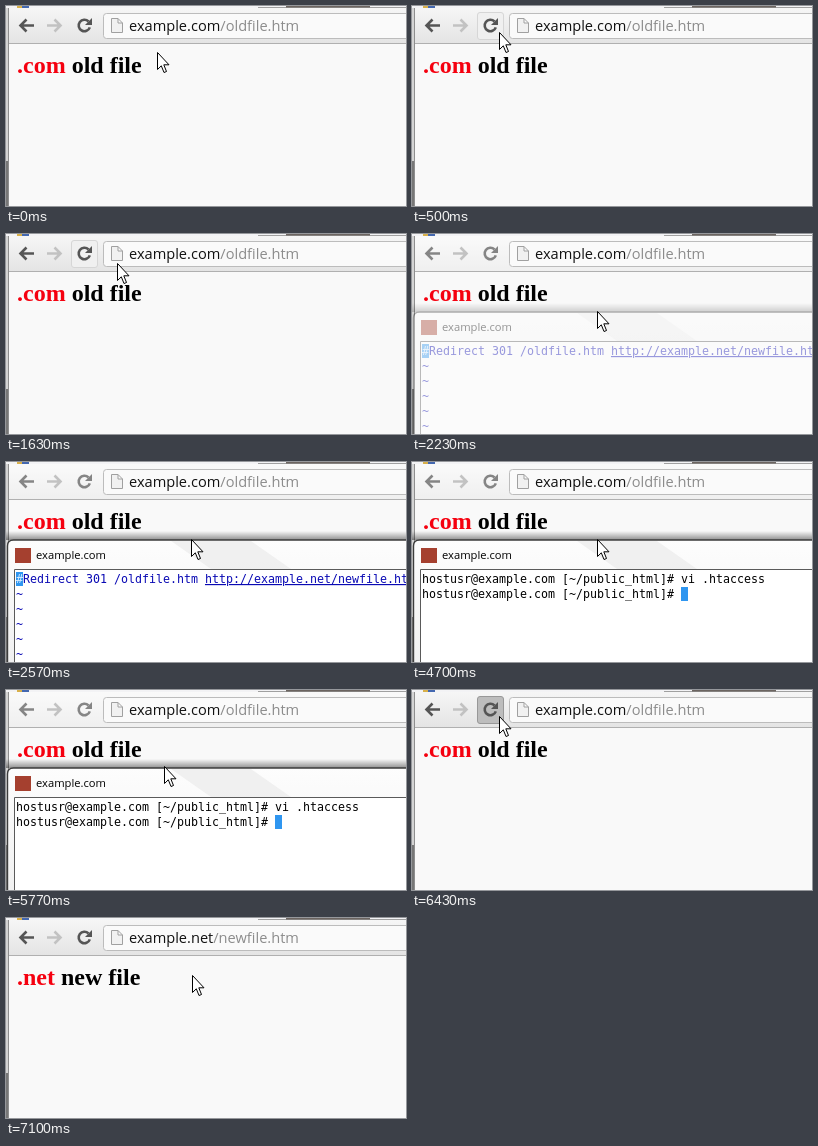
An HTML page for the animation above (7.37 s loop, 400x200 px).

```html
<!DOCTYPE html>
<html lang="en">
<head>
<meta charset="utf-8">
<title>Redirect demo</title>
<style>
  html, body { margin: 0; width: 100%; height: 100%; overflow: hidden; background: #f9f9f9; }
  svg { display: block; width: 100%; height: 100%; }
  text { white-space: pre; }
  .ui { font-family: "Open Sans", "Noto Sans", sans-serif; }
  .url { font-size: 14.6px; fill: #111; }
  .path { fill: #8c8c8c; }
  .heading { font: bold 24px "Liberation Serif", "Times New Roman", serif; }
  .red { fill: #f5000f; }
  .mono { font: 11.63px "DejaVu Sans Mono", monospace; }
  .blue { fill: #0a0ab4; }
  .cyan { fill: #00b4b4; }
  .link { text-decoration: underline; }
  .block { fill: #2f96f0; }
  .icon { fill: none; stroke: #555; stroke-width: 2.6; }
  .head { fill: #555; }
  .inactive .icon { stroke: #858585; }
  .inactive .head { fill: #858585; }
  .icon.off, .inactive .icon.off { stroke: #c2c2c2; }
  #button { fill: none; stroke: none; }
  #button.hover { fill: #f0f0f0; stroke: #d6d6d6; }
  #button.pressed { fill: #bdbdbd; stroke: #989898; }
</style>
</head>
<body>
<svg viewBox="0 0 400 200">
  <defs>
    <linearGradient id="bar" x2="0" y2="1">
      <stop stop-color="#f6f6f6"/><stop offset="1" stop-color="#e4e4e4"/>
    </linearGradient>
    <linearGradient id="glass" x2="0" y2="1">
      <stop stop-color="#fdfdfd"/><stop offset="1" stop-color="#f0f0f0"/>
    </linearGradient>
    <linearGradient id="shade" x2="0" y2="1">
      <stop stop-color="#000" stop-opacity="0"/><stop offset="1" stop-color="#000" stop-opacity=".42"/>
    </linearGradient>
  </defs>

  <g id="browser">
    <path fill="#f9f9f9" d="M0 0H400V200H0Z"/>
    <path fill="#f3f3f5" d="M0 0H400V2H0Z"/>
    <path fill="#d8b04a" d="M11 0h5v2h-5z"/>
    <path fill="#4468b0" d="M16 0h7v2h-7z"/>
    <path fill="#a0a0a0" d="M252 1H400V2H252Z"/>
    <path fill="#6b6460" d="M280 0h84v1.5h-84z"/>
    <path fill="url(#bar)" d="M2 2H400V37H2Z"/>
    <path id="lighten" fill="#fff" opacity=".4" d="M2 2H400V37H2Z"/>
    <path fill="#b0b0b0" d="M2 37H400V38H2Z"/>
    <path fill="#d4d4d4" d="M0 2H2V155H0Z"/>
    <path fill="#777" d="M0 155H2V200H0Z"/>
    <path fill="#8e8e8e" d="M2 2H3V200H2Z"/>

    <path class="icon" d="M28 19.5H15M20.5 13.5L14.5 19.5L20.5 25.5"/>
    <path class="icon off" d="M41 19.5H54M48.5 13.5L54.5 19.5L48.5 25.5"/>
    <rect id="button" x="65.5" y="6.5" width="26" height="27" rx="2.5"/>
    <path class="icon" d="M82.5 15.5A5.7 5.7 0 1 0 83.8 21.3"/>
    <path class="head" d="M86 12V19H79Z"/>

    <rect x="97.5" y="7.5" width="310" height="25" rx="3" fill="#fafafa" stroke="#bcbcbc"/>
    <path fill="#f1f1f1" stroke="#a0a0a0" d="M105.5 12.5H112L116.5 17V26.5H105.5ZM112 12.5V17H116.5"/>

    <g class="ui url">
      <text class="old" x="123" y="25">example.com<tspan class="path">/oldfile.htm</tspan></text>
      <text class="new" x="123" y="25">example.net<tspan class="path">/newfile.htm</tspan></text>
    </g>
    <g class="heading">
      <text class="old" x="11" y="67"><tspan class="red">.com</tspan> old file</text>
      <text class="new" x="11" y="67"><tspan class="red">.net</tspan> new file</text>
    </g>
  </g>

  <g id="terminal">
    <path fill="url(#shade)" d="M0 69H400V78H0Z"/>
    <path fill="url(#glass)" stroke="#3c3c3c" stroke-width="1.4" d="M1.5 210V84Q1.5 78 7.5 78H410V210Z"/>
    <path fill="#ebebeb" d="M165 79H245L285 107H205Z" opacity=".7"/>
    <path fill="#fff" stroke="#5a5a5a" d="M8.5 210V107.5H410V210Z"/>
    <rect x="9" y="86" width="16" height="15" fill="#a5402f"/>
    <text class="ui" font-size="11.2" x="30" y="97">example.com</text>

    <g class="mono">
      <g id="vi">
        <rect class="block" x="10" y="110" width="7" height="14"/>
        <g id="tildes" class="blue"></g>
        <text id="commented" class="blue" x="10" y="121"><tspan fill="#d5ecff">#</tspan>Redirect 301 /oldfile.htm <tspan class="link">http://example.net/newfile.htm</tspan></text>
        <text id="enabled" x="10" y="121"><tspan fill="#a8f0ff">R</tspan><tspan class="cyan">edirect</tspan> 301 /oldfile.htm <tspan class="link">http://<tspan class="cyan">example</tspan>.net/newfile.htm</tspan></text>
      </g>
      <g id="shell">
        <text x="10" y="121">hostusr@example.com [~/public_html]# vi .htaccess</text>
        <text x="10" y="136">hostusr@example.com [~/public_html]#</text>
        <rect class="block" x="269" y="125" width="7" height="14"/>
      </g>
    </g>
  </g>

  <path id="pointer" fill="#fff" stroke="#000" stroke-linejoin="round"
        d="M.5 .5V17.5L4.3 13.8L7 20.5L9.5 19.5L6.8 12.8H12Z"/>
</svg>
<script>
  const LOOP = 7370, TICK = 200 / 3;
  // Pointer stops: time in ms, x, y
  const route = [
    [33, 151, 46], [500, 87, 26], [1567, 87, 26], [1633, 111, 29],
    [1833, 204, 74], [1967, 185, 77], [5500, 185, 77], [5567, 153, 69],
    [5633, 158, 76], [5833, 158, 76], [6367, 87, 26], [6500, 87, 26], [7100, 186, 57]
  ];
  const $ = id => document.getElementById(id);
  const show = (el, on) => { el.style.display = on ? '' : 'none'; };
  const within = (t, from, to) => t >= from && t < to;

  $('tildes').innerHTML = [136, 151, 166, 181, 196]
    .map(y => `<text x="10" y="${y}">~</text>`).join('');

  function pointerAt(t) {
    const time = 100 + TICK * Math.floor((t - 96) / TICK);
    const next = route.findIndex(stop => stop[0] > time);
    if (next < 0) return route[route.length - 1].slice(1);
    if (next === 0) return route[0].slice(1);
    const [t0, x0, y0] = route[next - 1], [t1, x1, y1] = route[next];
    const u = (time - t0) / (t1 - t0), k = u * u * (3 - 2 * u);
    return [x0 + (x1 - x0) * k, y0 + (y1 - y0) * k].map(Math.round);
  }

  function render(t) {
    const [x, y] = pointerAt(t);
    $('pointer').setAttribute('transform', `translate(${x} ${y})`);

    const pressed = within(t, 970, 1170) || within(t, 6430, 6500);
    $('button').setAttribute('class', pressed ? 'pressed' : x < 112 && y < 34 ? 'hover' : '');

    const open = within(t, 2230, 5830);
    show($('terminal'), open);
    show($('lighten'), open);
    $('browser').setAttribute('class', open ? 'inactive' : '');
    $('terminal').style.opacity = t < 2300 ? .4 : t < 2370 ? .8 : 1;

    show($('vi'), t < 4700);
    show($('shell'), t >= 4700);
    show($('commented'), t < 3430);
    show($('enabled'), t >= 3430);

    const redirected = t >= 6570;
    document.querySelectorAll('.old').forEach(el => show(el, !redirected));
    document.querySelectorAll('.new').forEach(el => show(el, redirected));
  }

  let start;
  function frame(now) {
    start ??= now;
    render((now - start) % LOOP);
    requestAnimationFrame(frame);
  }
  render(0);
  requestAnimationFrame(frame);
</script>
</body>
</html>
```
